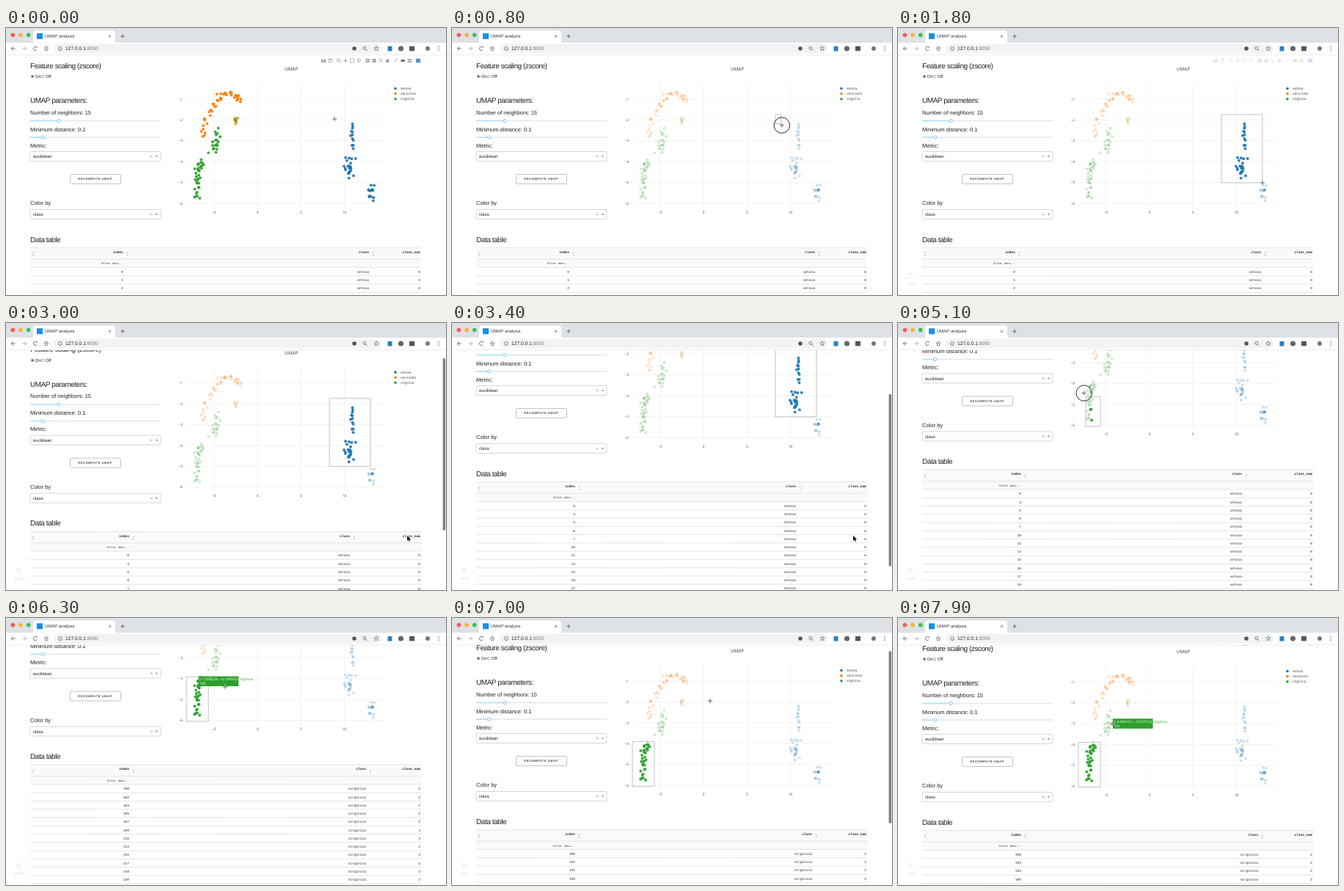
Write an HTML page with a canvas that moves like this. It is 600x364 px and loops after 8000 ms.

```html
<!DOCTYPE html>
<html lang="en">
<head>
<meta charset="utf-8">
<title>UMAP analysis</title>
<style>
html, body { margin: 0; width: 100%; height: 100%; overflow: hidden; background: #fff; }
canvas { display: block; }
</style>
</head>
<body>
<canvas id="stage" width="600" height="364"></canvas>
<script>
const c = document.getElementById('stage').getContext('2d');
const SANS = '"Liberation Sans", Arial, sans-serif';
const PLOT = '"Open Sans", sans-serif';
const MONO = '"Liberation Mono", monospace';
const LOOP = 8000;
const INK = '#222', GREY = '#777';
const species = { setosa: '#1f77b4', versicolor: '#ff7f0e', virginica: '#2ca02c' };

// Points scattered along a cubic curve.
let seed = 11;
const rand = () => (seed = seed * 16807 % 2147483647) / 2147483647;
const dots = [];
function strand(name, count, spread, a, b, d, e) {
  for (let i = 0; i < count; i++) {
    const u = (i + rand()) / count, v = 1 - u;
    const [x, y] = [0, 1].map(k => v * v * v * a[k] + 3 * v * v * u * b[k] + 3 * v * u * u * d[k]
      + u * u * u * e[k] + (rand() + rand() - 1) * spread);
    dots.push({ x, y, color: species[name] });
  }
}
strand('setosa', 12, 2.5, [473, 131], [473, 142], [470, 150], [473, 166]);
strand('setosa', 22, 8, [470, 174], [466, 185], [469, 192], [472, 202]);
strand('setosa', 16, 7, [496, 216], [496, 221], [496, 226], [496, 231]);
strand('versicolor', 44, 5, [322, 103], [308, 68], [274, 100], [267, 150]);
strand('versicolor', 4, 3, [315, 121], [315, 124], [313, 127], [313, 130]);
strand('virginica', 1, 1, [313, 126], [313, 126], [313, 126], [313, 126]);
strand('virginica', 18, 8, [290, 141], [286, 150], [290, 162], [276, 173]);
strand('virginica', 34, 6, [267, 180], [259, 188], [263, 208], [261, 236]);

function ease(t, from, to) {
  const u = Math.min(1, Math.max(0, (t - from) / (to - from)));
  return u * u * (3 - 2 * u);
}
const scrollAt = t => 99.5 * ease(t, 2800, 3610) - 89.5 * ease(t, 6400, 7040);
const barAlpha = t => .5 * (ease(t, 2800, 2870) - ease(t, 3900, 4300) + ease(t, 6420, 6490) - ease(t, 7450, 7800));
const modeAlpha = t => 1 - ease(t, 450, 750) + ease(t, 1700, 2000) - ease(t, 2150, 2450) + ease(t, 7050, 7350);

const moves = [
  { from: 0, to: 250, x: 441, y: 118 },
  { from: 500, to: 1700, x: 497, y: 211 },
  { from: 2000, to: 2700, x: 548, y: 293 },
  { from: 3700, to: 4400, x: 518, y: 145 },
  { from: 4520, to: 4740, x: 276, y: 141 },
  { from: 4800, to: 5250, x: 246, y: 80 },
  { from: 5700, to: 6250, x: 299, y: 94 },
  { from: 6450, to: 6980, x: 352, y: 113 },
  { from: 7250, to: 7800, x: 292, y: 144 }
];
const drags = [{ from: 400, to: 1700 }, { from: 4800, to: 5600 }];

function cursorAt(t) {
  let x = 448, y = 124;
  for (const m of moves) {
    const u = ease(t, m.from, m.to);
    x += (m.x - x) * u;
    y += (m.y - y) * u;
  }
  return [x, y];
}
function selection(t, lag) {
  const drag = drags.filter(d => t >= d.from).pop();
  if (!drag) return null;
  const [x0, y0] = cursorAt(drag.from);
  const [x1, y1] = cursorAt(Math.min(drag.to, Math.max(drag.from, t - lag)));
  return { x: Math.min(x0, x1), y: Math.min(y0, y1) + scrollAt(drag.from), w: Math.abs(x1 - x0), h: Math.abs(y1 - y0) };
}

// y is the middle of the capitals.
function text(s, x, y, size, { color = INK, align = 'left', font = SANS, style = '', gap = 0 } = {}) {
  c.font = `${style} ${size}px ${font}`;
  c.letterSpacing = gap + 'px';
  c.textRendering = 'geometricPrecision';
  c.textAlign = align;
  c.fillStyle = color;
  c.fillText(s, x, y + size * .35);
}
function box(x, y, w, h, color, r = 0) {
  c.fillStyle = color;
  c.beginPath(); c.roundRect(x, y, w, h, r); c.fill();
}
function frame(x, y, w, h, color, r = 0, width = .7) {
  c.strokeStyle = color; c.lineWidth = width;
  c.beginPath(); c.roundRect(x, y, w, h, r); c.stroke();
}
function disc(x, y, r, color) { c.fillStyle = color; c.beginPath(); c.arc(x, y, r, 0, 7); c.fill(); }
function ring(x, y, r, color, width = .8, from = 0, to = 7) {
  c.strokeStyle = color; c.lineWidth = width;
  c.beginPath(); c.arc(x, y, r, from, to); c.stroke();
}
function trace(p) {
  c.beginPath();
  for (let i = 0; i < p.length; i += 2) c.lineTo(p[i], p[i + 1]);
}
function line(color, width, ...p) { c.strokeStyle = color; c.lineWidth = width; trace(p); c.stroke(); }
function shape(color, ...p) { c.fillStyle = color; trace(p); c.fill(); }
function triangle(x, y, r, color, dir = 1) { shape(color, x - r, y, x + r, y, x, y + r * dir); }
function cross(x, y, r, color, width) {
  line(color, width, x - r, y - r, x + r, y + r);
  line(color, width, x + r, y - r, x - r, y + r);
}
function plus(x, y, r, color, width) {
  line(color, width, x - r, y, x + r, y);
  line(color, width, x, y - r, x, y + r);
}
function lens(x, y, color) {
  ring(x - .6, y - .6, 2, color);
  line(color, .9, x + 1, y + 1, x + 3, y + 3);
}
function arrow(x, y, dir, color) {
  line(color, .9, x - 2.7, y, x + 2.7, y);
  line(color, .9, x + .2 * dir, y - 2.6, x + 2.8 * dir, y, x + .2 * dir, y + 2.6);
}
function star(x, y, r, color) {
  const p = [];
  for (let i = 0; i < 11; i++) {
    const a = i * Math.PI / 5 - Math.PI / 2, q = i % 2 ? r / 2.2 : r;
    p.push(x + q * Math.cos(a), y + q * Math.sin(a));
  }
  line(color, .7, ...p);
}

function browser() {
  const ink = '#5f6368', y = 28;
  box(0, 0, 600, 20, '#dee1e6');
  ['#fc5753', '#f5b43a', '#33c748'].forEach((k, i) => disc(9.3 + i * 10.7, 9.6, 2.8, k));
  box(37, 3.5, 112, 20, '#fff', 4);
  box(42, 7.2, 8, 8, '#1691e5');
  text('UMAP analysis', 53, 11.3, 6, { color: '#333' });
  cross(141.5, 11.3, 1.7, ink, .8);
  plus(159, 11.3, 2.7, ink, .9);
  box(0, 20, 600, 17, '#fff');
  box(65, 21.5, 447, 13, '#f1f3f4', 6.5);
  line('#ddd', .6, 0, 36.7, 600, 36.7);
  arrow(10, y, -1, ink);
  arrow(25, y, 1, '#aaa');
  ring(40, y, 2.6, ink, .9, .6, 5.6);
  triangle(42, y - 2.6, 1.4, ink);
  line(ink, .9, 52, y, 55, y - 3, 58, y);
  frame(53.3, y, 3.4, 2.8, ink);
  ring(74, y, 2.6, ink, .7);
  line(ink, .7, 74, y - .4, 74, y + 1.5);
  text('127.0.0.1', 81, y, 6.7);
  text(':8050', 81 + c.measureText('127.0.0.1').width, y, 6.7, { color: GREY });
  disc(475, y, 2.8, '#555');
  lens(489.5, y, ink);
  star(505, y, 3.3, ink);
  box(520.5, y - 3, 6, 6.5, '#2c7fc4');
  disc(538.5, y, 3.6, '#666');
  box(550, y - 3.2, 7, 6.5, '#555');
  disc(575, y, 3, GREY);
  for (let i = -1; i < 2; i++) disc(590, y + i * 2.5, .7, ink);
}

const heading = (s, y) => text(s, 33, y, 10, { gap: -.45 });
const label = (s, y) => text(s, 33, y, 7.55);
function select(y, value) {
  frame(33, y, 178, 13, '#c4c4c4', 1.5);
  text(value, 37, y + 6.6, 6);
  cross(198.3, y + 6.6, 1.5, '#888', .6);
  triangle(205.5, y + 5.8, 2, '#888');
}
function slider(y, x) {
  line('#e6e6e6', 1.4, 33, y, 211, y);
  line('#abe2fb', 1.4, 33, y, x, y);
  disc(x, y, 2.3, '#fff');
  ring(x, y, 2.1, '#76cdf5', 1);
}
function radio(x, y, name, on) {
  ring(x, y, 1.9, GREY, .6);
  if (on) disc(x, y, 1.1, '#333');
  text(name, x + 3.7, y, 6);
}
function controls() {
  heading('Feature scaling (zscore)', 51);
  radio(36, 66.1, 'On', true);
  radio(50, 66.1, 'Off', false);
  heading('UMAP parameters:', 98.5);
  label('Number of neighbors: 15', 115);
  slider(126.5, 72);
  label('Minimum distance: 0.1', 138);
  slider(149, 50.5);
  label('Metric:', 160);
  select(168.5, 'euclidean');
  frame(87.5, 199.5, 69, 13, '#aaa', 1.5);
  text('RECOMPUTE UMAP', 98.3, 206, 4.1, { color: '#444', style: 'bold', gap: .5 });
  label('Color by', 238.5);
  select(247.5, 'class');
}

// Toolbar glyphs, each drawn around its own origin.
const tool = '#999';
const camera = () => { box(-3, -1.6, 6, 4, tool); disc(0, .4, 1, '#fff'); };
const disk = () => { frame(-2.3, -2.3, 4.6, 4.6, tool); box(-1, -2.3, 2, 1.6, tool); };
const zoom = () => lens(0, 0, tool);
const pan = () => plus(0, 0, 2.7, tool, .9);
const marquee = () => { c.setLineDash([1.2, .5]); frame(-2.5, -2.5, 5, 5, GREY); c.setLineDash([]); };
const lasso = () => { ring(0, -.6, 2, tool); line(tool, .8, -1.4, .8, -1, 2.8); };
const zoomIn = () => { box(-2.5, -2.5, 5, 5, tool); plus(0, 0, 1.5, '#fff', .8); };
const zoomOut = () => { box(-2.5, -2.5, 5, 5, tool); line('#fff', .8, -1.5, 0, 1.5, 0); };
const autoscale = () => cross(0, 0, 2.4, tool, .9);
const home = () => { triangle(0, 0, 2.7, tool, -1); box(-2, 0, 4, 2.5, tool); };
const spike = () => line(tool, .8, -2, 2.3, 0, -1.5, 2, -1.5);
const closest = () => box(-2.7, -1.5, 5.4, 3, GREY);
const compare = () => { box(-2.7, -2.2, 5.4, 1.8, tool); box(-2.7, .6, 5.4, 1.8, tool); };
const badge = () => box(-3, -2.7, 6, 5.4, '#4f91d6');
const toolGroups = [[camera, disk], [zoom, pan, marquee, lasso],
  [zoomIn, zoomOut, autoscale, home], [spike, closest, compare], [badge]];

function modebar(alpha) {
  c.save();
  c.globalAlpha = alpha;
  c.translate(433, 44.5);
  for (const group of toolGroups) {
    for (const glyph of group) { glyph(); c.translate(9.1, 0); }
    c.translate(2.7, 0);
  }
  c.restore();
}

function plot(t) {
  const tick = (s, x, y, align) => text(s, x, y, 4.8, { color: '#444', align, font: PLOT });
  for (let v = -5; v <= 10; v += 5) {
    const x = 343 + v * 11.86;
    line('#eee', .7, x, 76, x, 245);
    tick(String(v).replace('-', '−'), x, 251, 'center');
  }
  for (let v = 1; v < 7; v++) {
    const y = 68.6 + v * 28.4;
    line('#eee', .7, 247, y, 518, y);
    tick('−' + v, 241, y, 'right');
  }
  text('UMAP', 389, 56, 6.3, { color: '#333', align: 'center', font: PLOT });
  modebar(modeAlpha(t));

  const area = selection(t, 90);
  Object.entries(species).forEach(([name, color], i) => {
    const y = 82.5 + i * 7.1;
    disc(531, y, 1.8, color);
    tick(name, 538, y, 'left');
  });
  for (const d of dots) {
    const inside = !area || d.x > area.x && d.x < area.x + area.w && d.y > area.y && d.y < area.y + area.h;
    c.globalAlpha = inside ? .93 : .23;
    disc(d.x, d.y, 1.95, d.color);
  }
  c.globalAlpha = 1;
  const r = selection(t, 25);
  if (r && r.w) {
    frame(r.x, r.y, r.w, r.h, '#ccc');
    c.setLineDash([1, 1]);
    frame(r.x, r.y, r.w, r.h, '#888', 0, .5);
    c.setLineDash([]);
  }
}

const views = [
  { from: 0, name: 'setosa', num: 0, ids: '0 1 2 3 4', index: 160, cls: 495, right: 565.5 },
  { from: 2050, name: 'setosa', num: 0, ids: '0 4 5 6 7 10 11 14 15 16 17 18', index: 168, cls: 469, right: 567 },
  { from: 5900, name: 'virginica', num: 2, ids: '100 102 104 105 107 109 110 112 115 117 118 120', index: 168, cls: 491, right: 567 }
];
function table(t) {
  const v = views.filter(view => t >= view.from).pop();
  const cell = (s, x, y, style = '', size = 4.55) => text(s, x, y, size, { align: 'right', font: MONO, style });
  const rule = y => line('#d3d3d3', .6, 33, y, v.right, y);
  heading('Data table', 288.2);
  box(33, 299.7, v.right - 33, 26.6, '#fafafa');
  [299.7, 315.2, 326.4].forEach(rule);
  cell('index', v.index, 305.3, 'bold');
  cell('class', v.cls, 305.3, 'bold');
  cell('class_num', 565, 305.3, 'bold');
  for (const x of [37, v.index + 5.5, v.cls + 5.8]) {
    triangle(x, 307, .9, GREY, -1.4);
    triangle(x, 309.3, .9, GREY, 1.4);
    disc(x + 3.8, 304.5, .4, '#aaa');
  }
  cell('filter data...', v.index, 321.2, '', 3.65);
  v.ids.split(' ').forEach((id, i) => {
    const y = 332.2 + i * 11.27;
    cell(id, v.index, y);
    cell(v.name, v.cls, y);
    cell(v.num, 565, y);
    rule(y + 5.6);
  });
}

function tooltip(x, y, coords, id) {
  const green = species.virginica;
  const put = (s, dx, dy, color) => text(s, x + dx, y + dy, 4.8, { color, font: PLOT });
  shape(green, x - 3, y + 6.5, x + .2, y + 4.5, x + .2, y + 8.5);
  box(x, y, 54.5, 13.5, green);
  put(coords, 1.5, 4, '#fff');
  put(id, 1.5, 10, '#fff');
  put('virginica', 55.5, 4, green);
}

function undo() {
  const color = '#c6e3f7';
  ring(17, 337.5, 2.6, color, .8, -2.2, 2.6);
  triangle(15, 335, 1.5, color);
  text('undo', 17.5, 347.7, 5.4, { color, align: 'center' });
}

function pointer(t, top) {
  const [x, y] = cursorAt(t);
  if (x < 520 && y < 246 - top) {
    plus(x, y, 3.5, '#fff', 1.5);
    plus(x, y, 3.2, '#333', .7);
  } else {
    const p = [x - 1, y - 3, x - 1, y + 4, x + .7, y + 2.6, x + 1.8, y + 5, x + 3, y + 4.5, x + 2, y + 2.2, x + 4.2, y + 2];
    line('#fff', 1.2, ...p, p[0], p[1]);
    shape('#111', ...p);
  }
  if (drags.some(d => t >= d.from - 60 && t < d.to + 60)) ring(x, y, 10.7, '#111', .9);
}

function draw(t) {
  const top = scrollAt(t);
  box(0, 0, 600, 364, '#fff');
  c.save();
  c.translate(0, -top);
  controls();
  plot(t);
  table(t);
  c.restore();
  if (t >= 1760) undo();
  if (t >= 6200 && t < 6450) tooltip(262.5, 79.5, '(−7.098239, −4.104553)', '100');
  if (t >= 7800) tooltip(293, 137.2, '(−4.568151, −3.013712)', '101');
  browser();
  box(595.7, 37 + top * .72, 3.5, 235, `rgba(0,0,0,${barAlpha(t).toFixed(3)})`, 1.7);
  pointer(t, top);
}

const start = performance.now();
function tick() {
  draw((performance.now() - start) % LOOP);
  requestAnimationFrame(tick);
}
tick();
</script>
</body>
</html>
```
